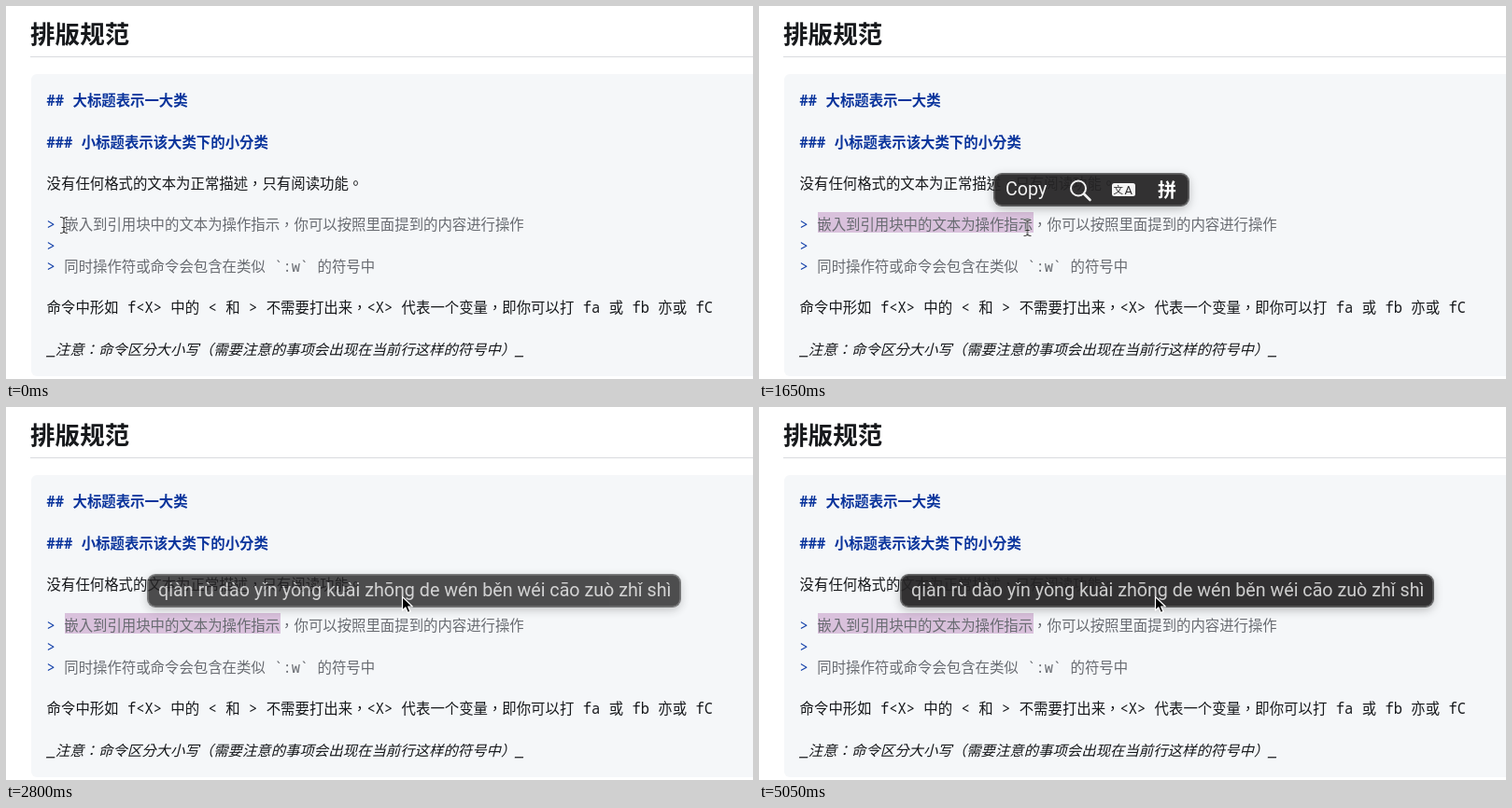
These frames come from a looping animation (800x400 px, 5100 ms). An HTML page:

```html
<!DOCTYPE html>
<html lang="zh-TW">
<head>
<meta charset="utf-8">
<title>排版规范</title>
<style>
  :root {
    --cjk: "Noto Sans CJK TC", "Noto Sans CJK SC", "Noto Sans CJK", sans-serif;
    --loop: 5100ms linear infinite both;
  }
  html, body { margin: 0; width: 100%; height: 100%; overflow: hidden; background: #fff; }
  #stage { position: relative; width: 800px; height: 400px; overflow: hidden; }
  #stage > * { position: absolute; }

  h1 {
    left: 26px; top: 9px; margin: 0;
    font: 700 26.6px/40px var(--cjk); color: #17191c;
  }
  .rule { left: 26px; top: 54px; width: 774px; height: 1px; background: #d9dbdf; }
  .panel {
    left: 27px; top: 73px; width: 790px; height: 324px;
    border-radius: 6px; background: #f5f7f9;
  }

  .code {
    left: 43.6px; top: 91.3px; color: #15171a;
    font: 15.4px/22.2px "Noto Sans Mono", "Noto Sans CJK TC", "Noto Sans CJK SC", "Noto Sans CJK", monospace;
    word-spacing: .2px; white-space: pre;
  }
  .code div { height: 22.2px; }
  .code .head { font-weight: 700; color: #0a349c; }
  .code .quote { color: #686b71; }
  .code b { font-weight: 400; color: #0f3da8; }
  .code .note { font-style: italic; }

  .selection {
    left: 62.5px; top: 221px; width: 231px; height: 22px;
    background: #d9c1dc; animation: select var(--loop);
  }
  @keyframes select {
    0%, 2.94% { width: 0; animation-timing-function: steps(10); }
    8.82% { width: 154px; animation-timing-function: steps(5); }
    15.69%, 100% { width: 231px; }
  }

  .popup {
    top: 180px; height: 34px; border-radius: 8px; overflow: hidden;
    background: rgba(38, 37, 38, .94); color: #f1f1f1;
    font: 19.7px/34px Roboto, Inter, sans-serif; white-space: pre;
    box-shadow: 0 0 0 1px rgba(0, 0, 0, .55), 0 3px 11px rgba(0, 0, 0, .28);
  }
  .popup::after {
    content: ""; position: absolute; inset: 0; border-radius: inherit;
    box-shadow: inset 0 0 0 1px rgba(255, 255, 255, .16);
  }
  .menu { left: 252px; width: 208px; animation: menu var(--loop); }
  .menu > * { position: absolute; top: 0; }
  .menu svg { left: 0; }
  .menu .copy { left: 12px; }
  .menu .pin { left: 175px; font: 700 20px/34px var(--cjk); color: #fff; }
  .hover {
    left: 162px; width: 46px; height: 34px; background: #a0519f;
    animation: hover var(--loop);
  }
  .pinyin { left: 152px; width: 570px; color: #cdcdcd; animation: pinyin var(--loop); }
  .pinyin span { position: absolute; left: 11px; }

  @keyframes menu {
    0%, 23.53% { opacity: 0; }
    26.47%, 50.98% { opacity: 1; }
    51.96%, 100% { opacity: 0; }
  }
  @keyframes hover {
    0%, 43.5% { opacity: 0; }
    43.51%, 100% { opacity: 1; }
  }
  @keyframes pinyin {
    0%, 51.96% { opacity: 0; }
    55.4%, 100% { opacity: 1; }
  }

  .pointer { left: 0; top: 0; overflow: visible; animation: move var(--loop); }
  @keyframes move {
    0% { transform: translate(62px, 235px); animation-timing-function: ease-in-out; }
    13.14% { transform: translate(287.5px, 238px); }
    33.33% { transform: translate(287.5px, 238px); animation-timing-function: ease-in-out; }
    45.1%, 48% { transform: translate(421px, 203px); }
    50%, 100% { transform: translate(424px, 203px); }
  }
  .beam { animation: beam var(--loop); }
  .arrow { animation: arrow var(--loop); }
  @keyframes beam {
    0%, 40.4% { opacity: 1; }
    40.41%, 100% { opacity: 0; }
  }
  @keyframes arrow {
    0%, 40.4% { opacity: 0; }
    40.41%, 100% { opacity: 1; }
  }
</style>
</head>
<body>
<div id="stage">
  <h1>排版规范</h1>
  <div class="rule"></div>
  <div class="panel"></div>
  <div class="selection"></div>

  <div class="code"><div class="head">## 大标题表示一大类</div><div></div><div class="head">### 小标题表示该大类下的小分类</div><div></div><div>没有任何格式的文本为正常描述，只有阅读功能。</div><div></div><div class="quote"><b>&gt;</b> 嵌入到引用块中的文本为操作指示，你可以按照里面提到的内容进行操作</div><div class="quote"><b>&gt;</b></div><div class="quote"><b>&gt;</b> 同时操作符或命令会包含在类似 `:w` 的符号中</div><div></div><div>命令中形如 f&lt;X&gt; 中的 &lt; 和 &gt; 不需要打出来，&lt;X&gt; 代表一个变量，即你可以打 fa 或 fb 亦或 fC</div><div></div><div class="note">_注意：命令区分大小写（需要注意的事项会出现在当前行这样的符号中）_</div></div>

  <div class="popup menu">
    <div class="hover"></div>
    <span class="copy">Copy</span>
    <svg width="208" height="34">
      <g fill="none" stroke="#f1f1f1" stroke-linecap="round">
        <circle cx="90" cy="15.5" r="8" stroke-width="2"/>
        <path d="M96 21.5L102.5 28" stroke-width="2.6"/>
      </g>
      <rect x="126" y="10" width="25" height="14" rx="2.5" fill="#f4f4f4"/>
      <g fill="#2b2a2b" font-size="10.5">
        <text x="127.5" y="21" font-family="Noto Sans CJK TC, Noto Sans CJK SC, sans-serif">文</text>
        <text x="139.5" y="21.5" font-size="13" font-family="Roboto, sans-serif">A</text>
      </g>
    </svg>
    <span class="pin">拼</span>
  </div>

  <div class="popup pinyin"><span>qiàn rù dào yǐn yòng kuài zhōng de wén běn wéi cāo zuò zhǐ shì</span></div>

  <svg class="pointer" width="1" height="1">
    <defs>
      <path id="bar" d="M-3.5 -8.5Q0 -8.5 0 -6Q0 -8.5 3.5 -8.5M0 -6V6M-3.5 8.5Q0 8.5 0 6Q0 8.5 3.5 8.5M-2 2.5H2"/>
    </defs>
    <g class="beam" fill="none" stroke-linecap="round">
      <use href="#bar" stroke="#fff" stroke-opacity=".7" stroke-width="2.4"/>
      <use href="#bar" stroke="#2a2a2a" stroke-width="1.1"/>
    </g>
    <path class="arrow" d="M.5 .5V15.2L3.9 12L6.3 17.6L9 16.4L6.7 11H11.3Z" fill="#000" stroke="#fff" stroke-width="1.2" stroke-linejoin="round"/>
  </svg>
</div>
</body>
</html>
```
